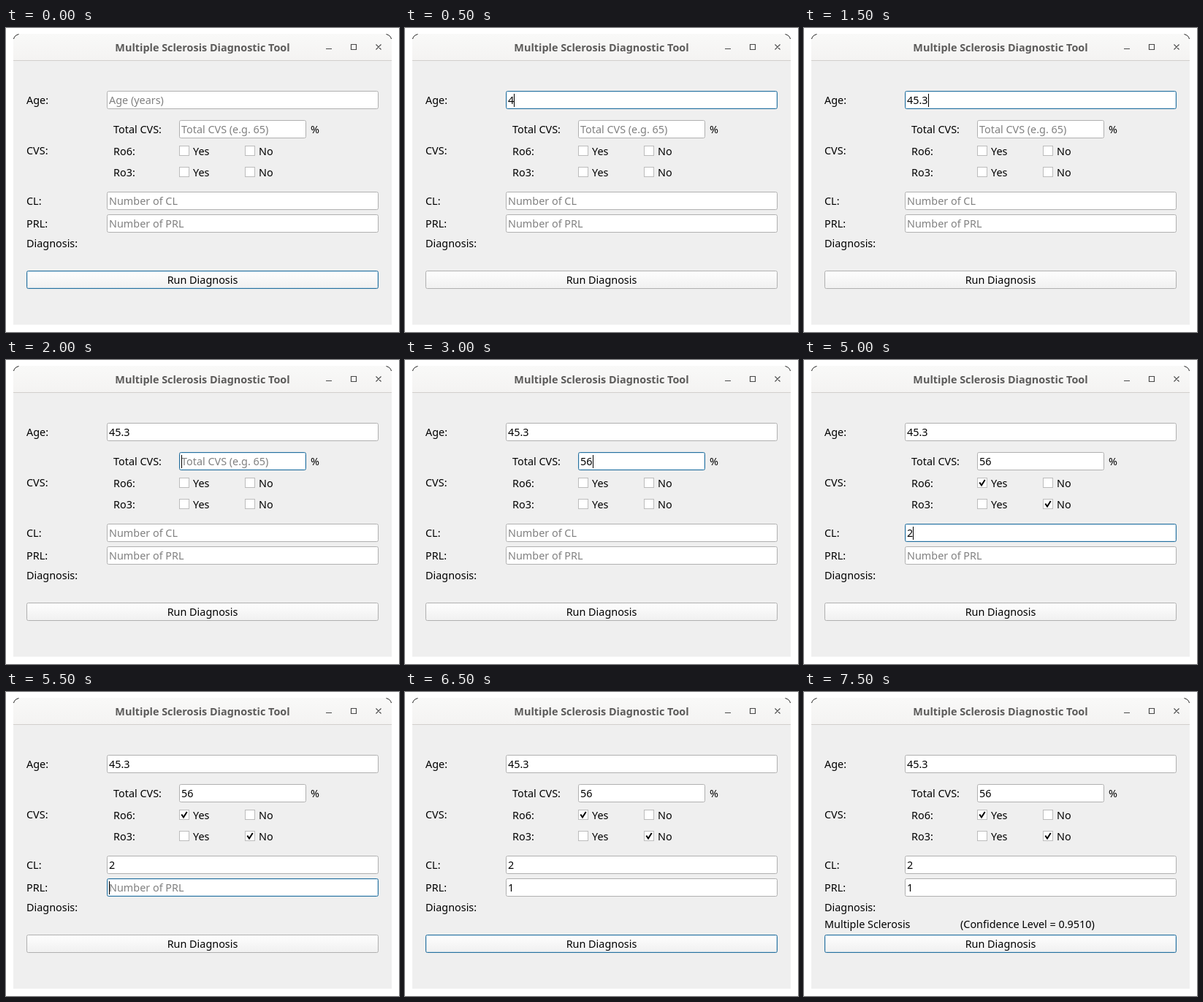
These frames come from a looping animation (538 by 416 pixels, 8000 ms). An HTML page:

```html
<!DOCTYPE html>
<html lang="en">
<head>
<meta charset="utf-8">
<title>Diagnostic form</title>
<style>
  html, body { margin: 0; width: 100%; height: 100%; overflow: hidden; background: #fff; }
  svg { display: block; }
  text { font: 14.4px "Noto Sans", "Open Sans", sans-serif; white-space: pre; }
  .title { font-weight: bold; fill: #5c5b5a; }
  .mid { text-anchor: middle; }
  .hint { fill: #808080; }
</style>
</head>
<body>
<svg id="stage" width="538" height="416" viewBox="0 0 538 416">
  <defs>
    <linearGradient id="bar" x2="0" y2="1">
      <stop stop-color="#f9f9f8"/><stop offset="1" stop-color="#f4f3f2"/>
    </linearGradient>
    <linearGradient id="button" x2="0" y2="1">
      <stop stop-color="#fefefe"/><stop offset="1" stop-color="#f0f0f0"/>
    </linearGradient>
  </defs>
  <path d="M10 406V17q0-9 9-9H519q9 0 9 9V406z" fill="#efefef"/>
  <path d="M10 44V17q0-9 9-9H519q9 0 9 9V44z" fill="url(#bar)"/>
  <path d="M10.5 15q1-5 7-6.5M527.5 15q-1-5-7-6.5" fill="none" stroke="#222"/>
  <path d="M10 44.5H528" stroke="#d2cfcc"/>
  <path d="M438 28.5h8M472.5 22.5h7v7h-7zM506.5 22.5l7 7m0-7l-7 7" fill="none" stroke="#4a4a4a" stroke-width="1.2"/>
  <text class="title mid" x="269" y="32">Multiple Sclerosis Diagnostic Tool</text>
  <g id="form"></g>
</svg>
<script>
const STEP = 500, LOOP = 8000;
const BLUE = '#26709e', GREY = '#b0b0b0';

// Each entry applies its changes on top of the ones before it.
const script = [
  { at: 0, focus: 'run', age: '', cvs: '', cl: '', prl: '' },
  { at: 500, focus: 'age', age: '4' },
  { at: 1000, age: '45' },
  { at: 1500, age: '45.3' },
  { at: 2000, focus: 'cvs' },
  { at: 2500, cvs: '5' },
  { at: 3000, cvs: '56' },
  { at: 3500, focus: 'ro6yes', ro6yes: true },
  { at: 4000, focus: 'ro3no', ro3no: true },
  { at: 4500, focus: 'cl' },
  { at: 5000, cl: '2' },
  { at: 5500, focus: 'prl' },
  { at: 6000, prl: '1' },
  { at: 6500, focus: 'run' },
  { at: 7500, result: true }
];

const stateAt = time => Object.assign({}, ...script.filter(s => s.at <= time));

const label = (x, y, text, cls = '') => `<text x="${x}" y="${y}" class="${cls}">${text}</text>`;

const box = (x, y, w, h, fill, stroke, r = 2) =>
  `<rect x="${x + .5}" y="${y + .5}" width="${w - 1}" height="${h - 1}" rx="${r}" fill="${fill}" stroke="${stroke}"/>`;

const frame = (x, y, w, fill, active) =>
  box(x, y, w, 25, fill, active ? BLUE : GREY) +
  (active ? box(x + 1, y + 1, w - 2, 23, 'none', '#308cc630', 1) : '');

const textWidth = text => [...text].reduce((w, c) => w + (c === '.' ? 3.9 : 8.3), 0);

function field(state, name, x, y, w, hint) {
  const value = state[name], active = state.focus === name;
  const caret = Math.round(x + 3 + textWidth(value)) + .5;
  return frame(x, y, w, '#fff', active) +
    label(x + 3, y + 18, value || hint, value ? '' : 'hint') +
    (active ? `<path d="M${caret} ${y + 4}v18" stroke="#000"/>` : '');
}

function check(state, name, x, y, text) {
  const active = state.focus === name;
  return (active ? box(x + 16, y - 4, text.length * 7 + 12, 21, '#d9e5ed', '#b3cedf', 1) : '') +
    box(x, y, 14, 14, '#fff', active ? BLUE : '#bcbcbc', 0) +
    (state[name] ? `<path d="M${x + 3.3} ${y + 6.5}l2.7 4 4.7-7.5" fill="none" stroke="#000" stroke-width="2"/>` : '') +
    label(x + 19, y + 13, text);
}

function render(state) {
  return [
    label(28, 104, 'Age:'), field(state, 'age', 138, 86, 372, 'Age (years)'),
    label(147, 144, 'Total CVS:'), field(state, 'cvs', 237, 126, 174, 'Total CVS (e.g. 65)'),
    label(417, 144, '%'), label(28, 173, 'CVS:'),
    ...['ro6', 'ro3'].map((row, i) => {
      const y = 161 + 29 * i;
      return label(147, y + 13, row === 'ro6' ? 'Ro6:' : 'Ro3:') +
        check(state, row + 'yes', 237, y, 'Yes') + check(state, row + 'no', 327, y, 'No');
    }),
    label(28, 242, 'CL:'), field(state, 'cl', 138, 224, 372, 'Number of CL'),
    label(28, 273, 'PRL:'), field(state, 'prl', 138, 255, 372, 'Number of PRL'),
    label(28, 300, 'Diagnosis:'),
    state.result ? label(28, 323, 'Multiple Sclerosis') + label(214, 323, '(Confidence Level = 0.9510)') : '',
    frame(28, 332, 482, 'url(#button)', state.focus === 'run'),
    label(269, 350, 'Run Diagnosis', 'mid')
  ].join('');
}

const form = document.getElementById('form');
let shown = -1;
function tick() {
  const step = Math.floor(performance.now() % LOOP / STEP);
  if (step !== shown) {
    shown = step;
    form.innerHTML = render(stateAt(step * STEP));
  }
  requestAnimationFrame(tick);
}
tick();
</script>
</body>
</html>
```
